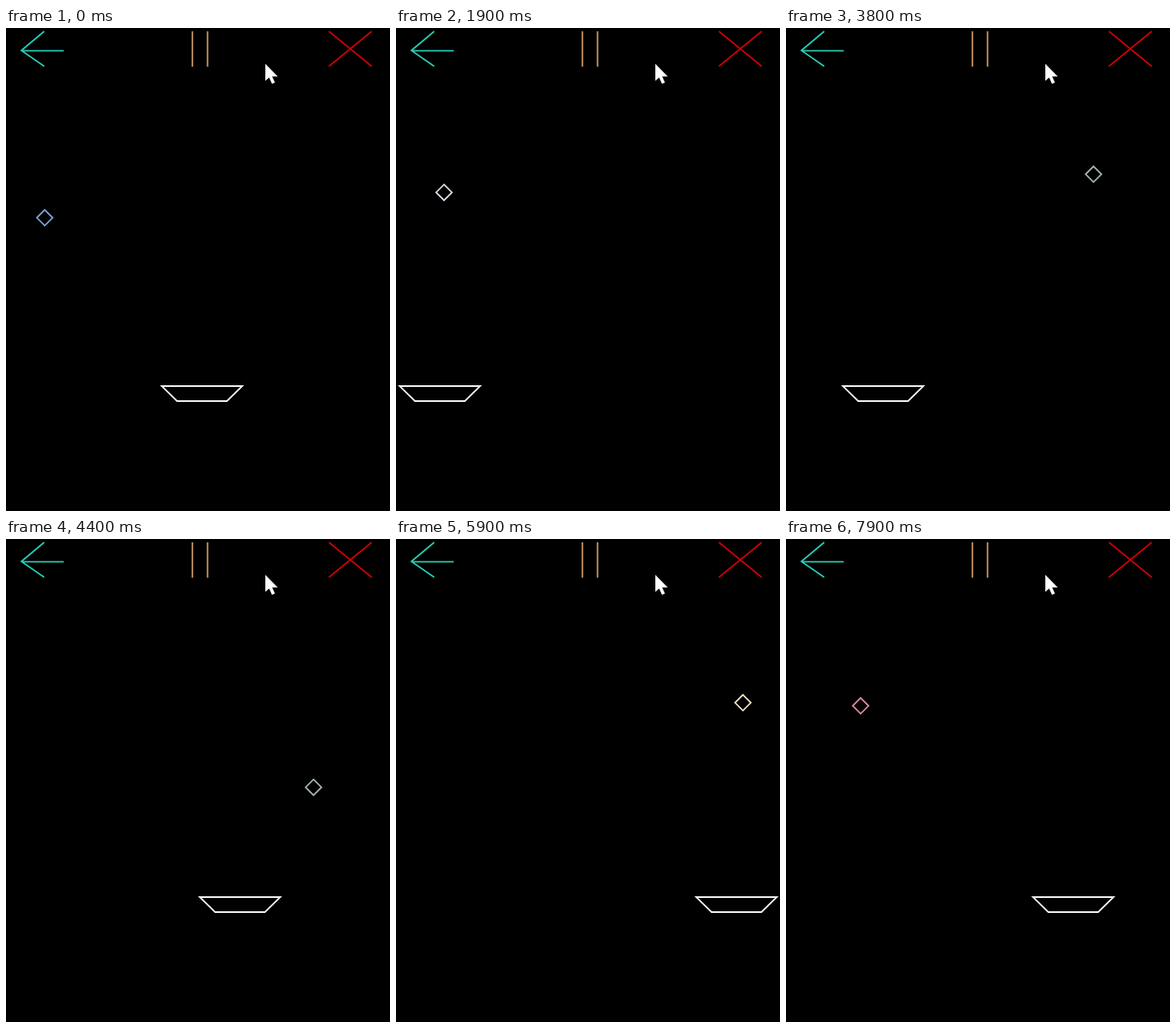
An HTML page for the animation above (8000 ms loop, 462 by 580 pixels).

```html
<!DOCTYPE html>
<html lang="en">
<head>
<meta charset="utf-8">
<title>Catch the diamonds</title>
<style>
  html, body { margin: 0; width: 100%; height: 100%; overflow: hidden; background: #000; }
  svg { display: block; width: 462px; height: 580px; }
  path { fill: none; stroke-width: 1.8; }
  .back { stroke: #27cdb7; }
  .pause { stroke: #d09c66; }
  .quit { stroke: #cc0206; }
  .paddle { stroke: #f6f6f6; }
  .cursor { fill: #fff; stroke: none; }
</style>
</head>
<body>
<svg viewBox="0 0 462 580">
  <path class="back" d="M46 4L18.5 27L46 46M18.5 27.3H69.5"/>
  <path class="pause" d="M224.3 4V46.5M242.5 4V46.5"/>
  <path class="quit" d="M388.5 4L440 46M440 4L388.5 46"/>
  <path class="paddle" id="paddle" d="M0 430H97L78.5 448H18.5Z"/>
  <path id="diamond" d="M0 -9.5L9.5 0L0 9.5L-9.5 0Z"/>
  <path class="cursor" d="M312 43V63.5L316.6 59.4L320 67L323.6 65.4L320.2 58.2H327Z"/>
</svg>
<script>
  const LOOP = 8000, TICK = 100;
  const STEP = 9.15, REPEAT = 1000 / 30;   // paddle step in px, key repeat in ms

  // Key presses: start time, number of steps, direction
  const keys = [
    [50, 20, -1], [2300, 1, 1], [3130, 1, 1], [3650, 28, 1],
    [5210, 9, 1], [7240, 1, -1], [7715, 6, -1]
  ];

  // Falling diamonds: start time, x, first y, speed in px/ms, colour
  const drops = [
    [0, 46.6, 227.8, 0.192, '#83a3d6'],
    [1000, 57.8, 11, 0.2072, '#dedbea'],
    [3000, 370, 12, 0.2044, '#a2b8b0'],
    [5000, 417.4, 11.8, 0.2053, '#eee5cb'],
    [7000, 89.8, 11.5, 0.2098, '#e58b9d']
  ];

  const paddle = document.getElementById('paddle');
  const diamond = document.getElementById('diamond');
  const place = (el, x, y) => el.setAttribute('transform', `translate(${x} ${y})`);

  function paddleX(t) {
    let x = 187.3;
    for (const [start, count, dir] of keys) {
      if (t >= start) x += dir * STEP * Math.min(count, Math.floor((t - start) / REPEAT) + 1);
    }
    return x;
  }

  function draw(now) {
    const t = Math.floor(now % LOOP / TICK) * TICK;
    place(paddle, paddleX(t), 0);
    const [start, x, y, speed, color] = drops.findLast(d => t >= d[0]);
    place(diamond, x, y + (t - start) * speed);
    diamond.setAttribute('stroke', color);
  }

  let origin;
  function frame(now) {
    origin ??= now;
    draw(now - origin);
    requestAnimationFrame(frame);
  }
  draw(0);
  requestAnimationFrame(frame);
</script>
</body>
</html>
```
